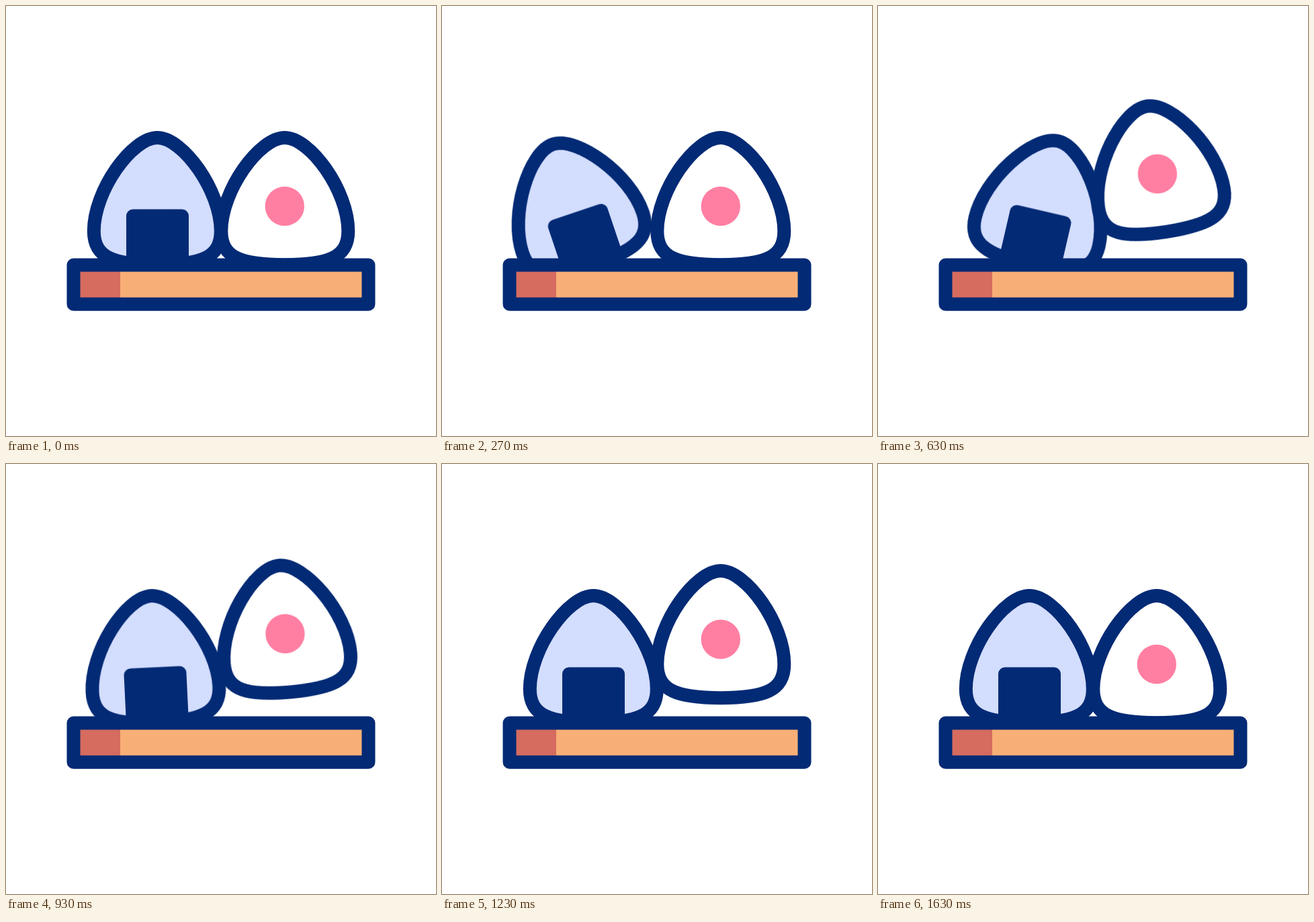
An HTML page without scripts that plays this animation: 640 by 640 pixels, repeating every 2 s.

```html
<!DOCTYPE html>
<html lang="en">
<head>
<meta charset="utf-8">
<title>Onigiri</title>
<style>
  html, body { margin: 0; width: 100%; height: 100%; overflow: hidden; background: #fff; }
  svg { display: block; width: 100%; height: 100%; }

  .line { stroke: #032a75; stroke-width: 20; stroke-linejoin: round; }
  .nori { fill: #032a75; }
  .plum { fill: #ff7fa2; }

  .tilt, .hop, .sway {
    animation: 2s cubic-bezier(.33, 0, .67, 1) infinite;
  }
  .tilt { animation-name: tilt; transform-origin: 225px 385px; }
  .hop  { animation-name: hop; }
  .sway { animation-name: sway; transform-origin: 415px 291px; }

  /* leans back, knocks its neighbour, settles */
  @keyframes tilt {
    0%      { transform: rotate(0deg); animation-timing-function: cubic-bezier(.33, .1, .67, 1); }
    20%     { transform: rotate(-24deg); }
    33.333% { transform: rotate(15deg); }
    50%     { transform: rotate(-5deg); }
    60%, to { transform: rotate(0deg); }
  }

  /* two bounces, the second half as high */
  @keyframes hop {
    0%, 25% { transform: translateY(0); animation-timing-function: cubic-bezier(.33, 0, .5, 1); }
    40%     { transform: translateY(-96px); animation-timing-function: cubic-bezier(.33, 0, .6, 1); }
    53.333% { transform: translateY(0); animation-timing-function: cubic-bezier(.33, 0, .5, 1); }
    66.667% { transform: translateY(-48px); }
    80%, to { transform: translateY(0); }
  }

  @keyframes sway {
    0%, 25% { transform: rotate(0deg); }
    33.333% { transform: rotate(-10deg); }
    60%, to { transform: rotate(0deg); }
  }
</style>
</head>
<body>
<svg viewBox="0 0 640 640">
  <defs>
    <path id="rice" d="M0 196C38 196 94.5 275 94.5 335C94.5 375 64 385.2 0 385.2S-94.5 375 -94.5 335C-94.5 275 -38 196 0 196Z"/>
  </defs>

  <g class="tilt">
    <use href="#rice" x="225.3" class="line" fill="#d3ddfe"/>
    <path class="nori" d="M179 386V312.5a10 10 0 0 1 10 -10H262a10 10 0 0 1 10 10V386Z"/>
  </g>

  <g class="hop">
    <g class="sway">
      <use href="#rice" x="414.8" class="line" fill="#fff"/>
      <circle class="plum" cx="414.8" cy="298" r="29.2"/>
    </g>
  </g>

  <rect x="100.5" y="385.5" width="439" height="58.2" fill="#f8af76"/>
  <rect x="100.5" y="385.5" width="69.5" height="58.2" fill="#d56c5f"/>
  <rect class="line" x="100.5" y="385.5" width="439" height="58.2" fill="none"/>
</svg>
</body>
</html>
```
